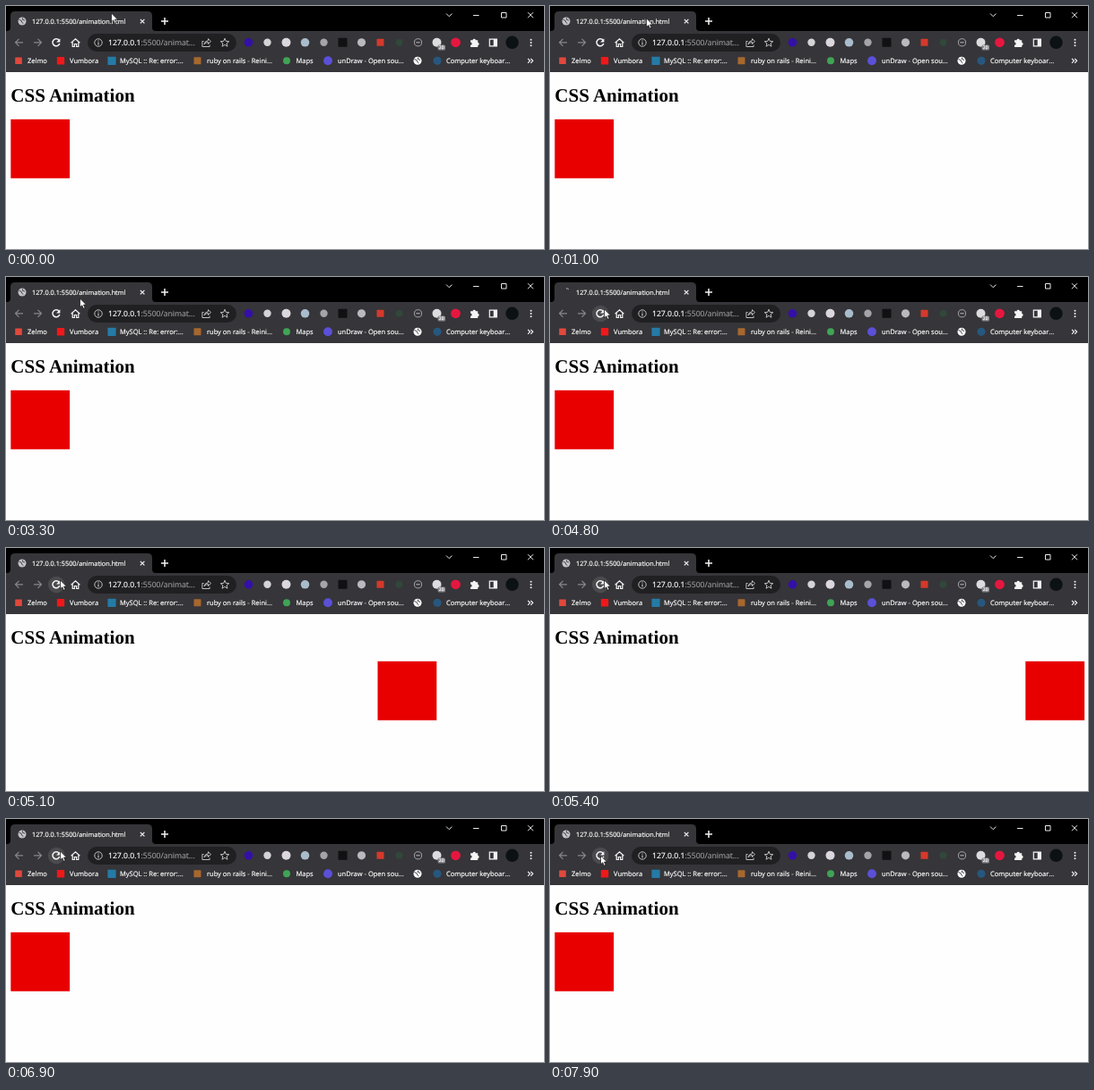
An HTML page for the animation above (8 s loop, 600 by 272 pixels).

```html
<!DOCTYPE html>
<html lang="en">
<head>
<meta charset="utf-8">
<title>CSS Animation</title>
<style>
  html, body { margin: 0; width: 100%; height: 100%; overflow: hidden; background: #fefefe; }
  svg { display: block; width: 100%; height: 100%; }
  text { font-family: "Open Sans", "Noto Sans", sans-serif; font-size: 7.5px; fill: #fff; stroke: #fff; stroke-width: .18; text-rendering: geometricPrecision; }
  .gray { fill: #97979b; stroke: #97979b; }
  .line { fill: none; stroke: #f4f4f5; stroke-width: 1.2; }
  .bold { stroke-width: 1.5; }
  .thin { stroke-width: .95; }
  .dim { stroke: #88878b; }
  .soft { stroke: #c4c4c7; }
  .title { font: bold 21px "Liberation Serif", "Noto Serif", serif; fill: #000; stroke: none; }
</style>
</head>
<body>
<svg viewBox="0 0 600 272">
  <defs>
    <g id="globe">
      <circle r="4.5"/>
      <path d="M-3.6-1.8L-.8-.6-.2 1.4 1.4 2.6M.8-3.8L.2-2l2.8 1.2" fill="none" stroke="#48474b"/>
    </g>
  </defs>
  <rect width="600" height="272" fill="#fefefe"/>
  <rect width="600" height="30" fill="#000"/>

  <!-- tab strip -->
  <path d="M1 28q4 0 4-4V11q0-5 5-5H158q5 0 5 5v13q0 4 4 4z" fill="#363539"/>
  <use id="favicon" href="#globe" x="18" y="17" fill="#c5c5c8"/>
  <path id="spinner" class="line thin soft" d="M18 12.8q1.8 0 2.8 1"/>
  <text x="29" y="19.8" style="font-size:7.3px">127.0.0.1:5500/animation.html</text>
  <path class="line" d="M149.8 14.8l4.6 4.6m0-4.6l-4.6 4.6"/>
  <path class="line bold" d="M173 17h8m-4-4v8"/>
  <path class="line thin" d="M491 8.5l3.2 3.2 3.2-3.2M521 10.5h6.5M552.5 7.5h5.5v5.5h-5.5zM582 7.2l6 6m0-6l-6 6"/>

  <!-- toolbar -->
  <rect y="28" width="600" height="46" fill="#363539"/>
  <path class="line dim" d="M19 40.8h-8.5m4-4l-4 4 4 4M31 40.8h8.5m-4-4l4 4-4 4"/>
  <circle id="hover" cx="56.2" cy="41" r="9.3" fill="#4b4a4e"/>
  <path class="line bold" d="M59.2 38.4a4 4 0 1 0 .6 3.6"/>
  <path d="M60.4 36.2v4.3h-4.3z" fill="#f4f4f5"/>
  <path class="line" d="M72.6 41.3l4.9-4.5 4.9 4.5M74.2 40.5v5h2.2v-3h2.2v3h2.2v-5"/>
  <rect x="91" y="31" width="166" height="20" rx="10" fill="#202023"/>
  <circle class="line thin soft" cx="103" cy="41" r="4.2"/>
  <path class="line soft" d="M103 38.4v1.2m0 .8v3.2"/>
  <text x="114" y="44" style="font-size:8.65px">127.0.0.1<tspan class="gray">:5500/animat...</tspan></text>
  <path class="line thin soft" d="M220.5 39.5h-1.6v6h8.2v-2M221 43q.5-4 4.5-4.3v-2l3 2.9-3 2.9v-2q-3 0-4.5 2.5z"/>
  <path id="star" class="line thin soft"/>
  <g id="extensions"></g>
  <path class="line thin soft" d="M457.4 40.8h4.2"/>
  <rect x="481.5" y="43.5" width="8.5" height="6" rx="1.5" fill="#85868b"/>
  <text x="482.8" y="48.4" style="font-size:5px">20</text>
  <path d="M518 38.2h2.4a1.8 1.8 0 0 1 3.5 0h2.3v2.5a1.8 1.8 0 0 1 0 3.5v1.8h-8.2v-2.2a1.6 1.6 0 0 0 0-3.2z" fill="#f4f4f5"/>
  <path class="line" d="M539.3 37.2h8v7.6h-8z"/>
  <path d="M543.7 37h4v8h-4z" fill="#f4f4f5"/>
  <g fill="#f4f4f5"><circle cx="585.5" cy="37.7" r="1"/><circle cx="585.5" cy="41" r="1"/><circle cx="585.5" cy="44.3" r="1"/></g>

  <!-- bookmarks -->
  <g id="bookmarks"></g>
  <use href="#globe" x="459" y="61.3" fill="#fff"/>
  <path class="line" d="M582 58.8l2.4 2.5-2.4 2.5m3.2-5l2.4 2.5-2.4 2.5"/>

  <!-- page -->
  <text class="title" x="5.3" y="107">CSS Animation</text>
  <rect id="box" y="126.8" width="65.8" height="66" fill="#e80000"/>
  <path id="cursor" d="M-.5 0v9.8l2.3-2.1 1.6 3.6 1.7-.8-1.6-3.4h3z" fill="#fff" stroke="#111" stroke-width=".7"/>
</svg>
<script>
const LOOP = 8000, STEP = 100;
const $ = id => document.getElementById(id);

function add(parent, tag, attrs, text) {
  const el = document.createElementNS(parent.namespaceURI, tag);
  for (const k in attrs) el.setAttribute(k, attrs[k]);
  if (text) el.textContent = text;
  parent.append(el);
}

const dot = (parent, cx, cy, r, fill) => add(parent, 'circle', { cx, cy, r, fill });
const ring = (parent, cx, cy, r, stroke) => add(parent, 'circle', { cx, cy, r, stroke, fill: 'none' });
const block = (parent, cx, cy, r, fill) =>
  add(parent, 'rect', { x: cx - r, y: cy - r, width: 2 * r, height: 2 * r, rx: .6, fill });

[
  [dot, 270.5, 4.8, '#3310a8'], [dot, 291.5, 4.2, '#d4d4d6'], [dot, 312.5, 5, '#dcd6de'],
  [dot, 333.5, 4.8, '#a9bccb'], [dot, 354.5, 4.2, '#a5a5a8'], [block, 375.5, 5, '#111113'],
  [dot, 396.5, 4.6, '#b9babc'], [block, 417.5, 4, '#d33a2c'], [dot, 438.5, 4, '#31473a'],
  [ring, 459.5, 4.1, '#a6a6a9'], [dot, 480.5, 5, '#dcdcde'], [dot, 501.5, 5.4, '#e5173f'],
  [dot, 564.5, 7.2, '#0c1114']
].forEach(([shape, x, r, color]) => shape($('extensions'), x, 40.8, r, color));

[
  [block, 14, 3.8, '#e2483d', 24, 'Zelmo'],
  [block, 61, 4.2, '#f01818', 71, 'Vumbora'],
  [block, 118, 4.6, '#247ba6', 127, 'MySQL :: Re: error:...'],
  [block, 213.5, 4, '#a8672c', 224, 'ruby on rails - Reini...'],
  [dot, 313, 4, '#3fa455', 323.5, 'Maps'],
  [dot, 359, 5, '#5b50d8', 370, 'unDraw - Open sou...'],
  [dot, 481, 4.6, '#27577e', 491, 'Computer keyboar...']
].forEach(([shape, x, r, color, tx, label]) => {
  shape($('bookmarks'), x, 61.3, r, color);
  add($('bookmarks'), 'text', { x: tx, y: 64.2 }, label);
});

const star = [...Array(10).keys()].map(i => {
  const a = i * Math.PI / 5, r = i % 2 ? 2.2 : 5;
  return `${244 + r * Math.sin(a)} ${41.2 - r * Math.cos(a)}`;
});
$('star').setAttribute('d', `M${star.join('L')}z`);

const clamp = v => Math.min(1, Math.max(0, v));
const progress = (t, from, to) => clamp((t - from) / (to - from));
const smooth = p => p * p * (3 - 2 * p);

// CSS "ease": cubic-bezier(.25, .1, .25, 1)
function ease(x) {
  if (x <= 0 || x >= 1) return clamp(x);
  const curve = (a, b, u) => 3 * a * u * (1 - u) ** 2 + 3 * b * u * u * (1 - u) + u ** 3;
  let lo = 0, hi = 1;
  for (let i = 0; i < 24; i++) {
    const mid = (lo + hi) / 2;
    if (curve(.25, .25, mid) < x) lo = mid; else hi = mid;
  }
  return curve(.1, 1, lo);
}

// [start, end, x, y] of each pointer move
const moves = [
  [800, 1600, 54, 45], [2900, 3300, 83, 24], [3900, 4700, 61, 36], [7300, 7900, 57, 41]
];

function pointer(t) {
  let x = 118, y = 8;
  for (const [from, to, nx, ny] of moves) {
    const p = smooth(progress(t, from, to));
    x += (nx - x) * p;
    y += (ny - y) * p;
  }
  return [x, y];
}

function draw(t) {
  const [x, y] = pointer(t);
  $('cursor').setAttribute('transform', `translate(${x} ${y})`);
  $('hover').style.display = Math.hypot(x - 56.2, y - 41) < 9.5 ? '' : 'none';

  const loading = t >= 4800 && t < 4900;
  $('spinner').style.display = loading ? '' : 'none';
  $('favicon').style.display = loading ? 'none' : '';

  const shift = ease(progress(t, 4842, 5382)) - ease(progress(t, 6540, 6900));
  $('box').setAttribute('x', 5.3 + 525 * shift);
}

const start = performance.now();
function tick() {
  const t = (performance.now() - start) % LOOP;
  draw(Math.floor(t / STEP) * STEP);
  requestAnimationFrame(tick);
}
tick();
</script>
</body>
</html>
```
